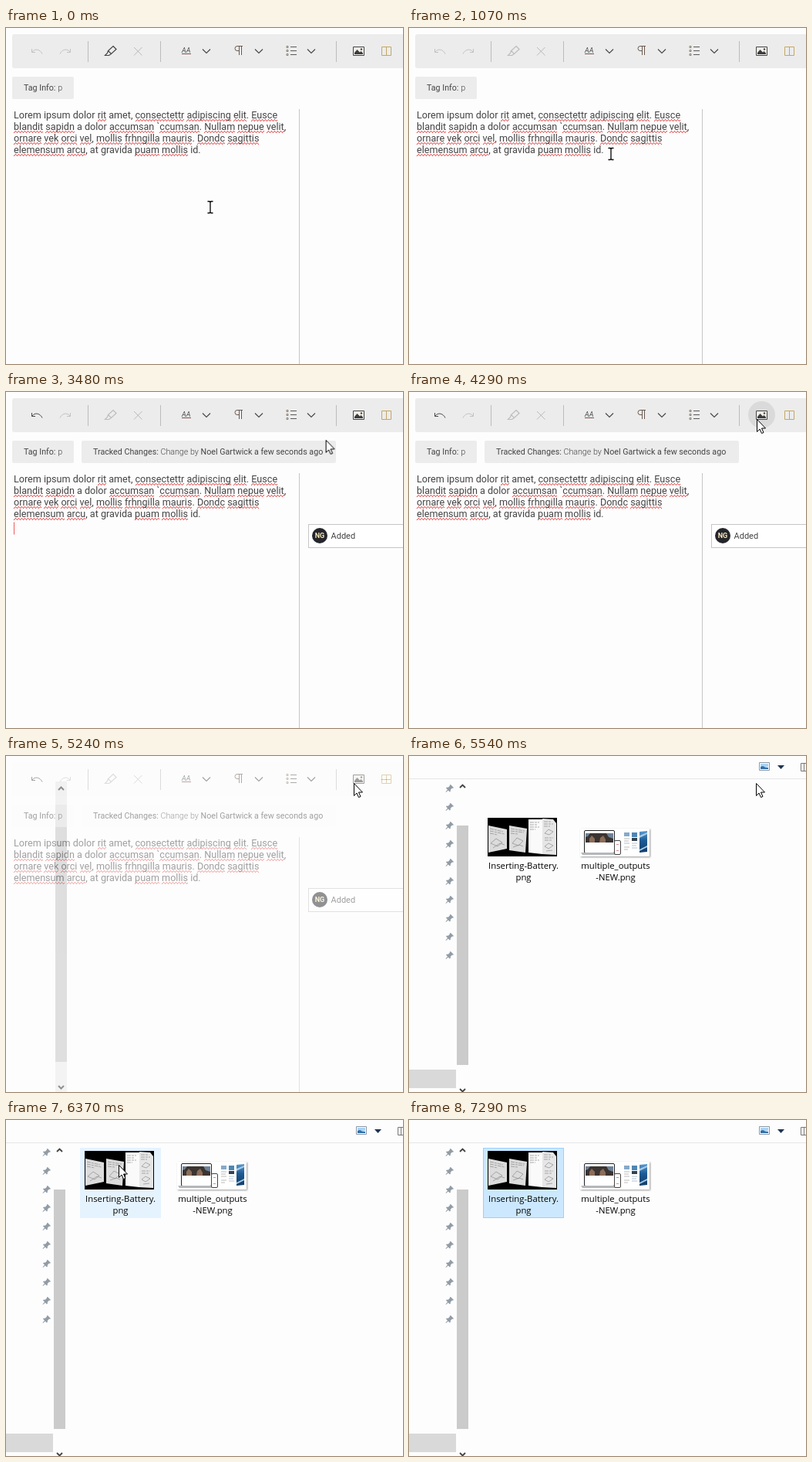
An HTML page that plays this animation: 515x435 px, repeating every 8000 ms.

```html
<!DOCTYPE html>
<html lang="en">
<head>
<meta charset="utf-8">
<title>Inserting an image</title>
<style>
  html, body { margin: 0; width: 100%; height: 100%; overflow: hidden; background: #fdfdfd; }
  .stage { position: relative; width: 515px; height: 435px; overflow: hidden; }
  svg { position: absolute; left: 0; top: 0; }
  text { font: 10.7px Roboto, sans-serif; fill: #444; }
  .light { font-weight: 300; }
  .line { fill: none; stroke: #4a4a4a; }
  .soft { stroke: #b9b9b9; }
  .panel { fill: #ececec; }
  .tip { fill: #fff; stroke: #000; }

  p {
    position: absolute; left: 10px; top: 105px; margin: 0;
    font: 12.6px/15px Roboto, sans-serif; color: #444; white-space: pre;
  }
  /* three one-pixel rows form a zigzag */
  u {
    --r: #e23c3c;
    text-decoration: none; padding-bottom: 1px;
    background:
      linear-gradient(90deg, #0000 2px, var(--r) 2px 3px, #0000 3px) 0 calc(100% - 2px) / 4px 1px repeat-x,
      linear-gradient(90deg, #0000 1px, var(--r) 1px 2px, #0000 2px 3px, var(--r) 3px) 0 calc(100% - 1px) / 4px 1px repeat-x,
      linear-gradient(90deg, var(--r) 1px, #0000 1px) 0 100% / 4px 1px repeat-x;
  }

  .dialog text { font: 11.3px "Open Sans", "Noto Sans", sans-serif; fill: #000; text-anchor: middle; }

  /* everything runs on one 8 s clock */
  .t { animation: 8s step-end infinite; }
  .brush { animation-name: brush; }
  .undo { animation-name: undo; }
  .end-caret { animation-name: end-caret; }
  .new-caret { animation-name: new-caret; }
  .change { animation-name: change; }
  .hover { animation-name: hover; }
  .panel { animation-name: panel; }
  .veil { animation-name: veil; }
  .dialog { animation-name: dialog; }
  .files { animation-name: files; }
  .pick { animation-name: pick; }
  .pass { animation-name: pass; }
  .beam { animation-name: beam; }
  .arrow { animation-name: arrow; }
  .mouse { animation-name: mouse; }

  @keyframes brush { 0% { stroke: #444 } 8.25%, to { stroke: #bdbdbd } }
  @keyframes undo { 0% { stroke: #c2c2c2 } 24.74%, to { stroke: #4a4a4a } }
  @keyframes end-caret { 0%, 24.74%, to { opacity: 0 } 19.37% { opacity: 1 } }
  @keyframes new-caret { 0%, 33.37%, 47.24%, to { opacity: 0 } 24.74%, 40% { opacity: 1 } }
  @keyframes change { 0% { opacity: 0 } 26.37%, to { opacity: 1 } }
  @keyframes hover { 0%, 62%, to { fill: #0000 } 50.43% { fill: #dadada } 59% { fill: #d2d2d2 } }
  @keyframes panel { 0% { fill: #ececec } 65.49%, to { fill: #fbfbfb } }
  @keyframes veil { 0%, 67.37%, to { opacity: 0 } 65.49% { opacity: .5 } }
  @keyframes dialog { 0% { opacity: 0 } 67.37% { opacity: .9 } 69.24%, to { opacity: 1 } }
  @keyframes files {
    0% { opacity: 0; transform: none }
    69.24% { opacity: 1; transform: none }
    72.49%, to { opacity: 1; transform: translateY(-40px) }
  }
  @keyframes pick {
    0% { fill: #0000; stroke: #0000 }
    79.61% { fill: #e5f3ff; stroke: #e5f3ff }
    81.49%, to { fill: #cce8ff; stroke: #99d1ff }
  }
  @keyframes pass { 0%, 77.83%, to { fill: #0000 } 76.05% { fill: #e5f3ff } }
  @keyframes beam { 0% { opacity: 1 } 39.32%, to { opacity: 0 } }
  @keyframes arrow { 0% { opacity: 0 } 39.32%, to { opacity: 1 } }
  @keyframes mouse {
    0% { transform: translate(265px, 232px) }
    3.25% { transform: translate(265px, 232px); animation-timing-function: steps(6, start) }
    15.4% { transform: translate(262px, 163px) }
    33.37% { transform: translate(262px, 163px); animation-timing-function: steps(7, start) }
    47.24% { transform: translate(440px, 45px); animation-timing-function: steps(2, start) }
    50.43% { transform: translate(478px, 26px); animation-timing-function: steps(3, start) }
    55.2% { transform: translate(451px, 35px) }
    69.24% { transform: translate(450px, 35px) }
    72.49% { transform: translate(450px, 35px); animation-timing-function: steps(5, start) }
    81.38% { transform: translate(146px, 58px) }
    83% { transform: translate(146px, 58px); animation-timing-function: steps(2, start) }
    86.24% { transform: translate(213px, 123px); animation-timing-function: steps(4, start) }
    92.7%, to { transform: translate(420px, 516px) }
  }
</style>
</head>
<body>
<div class="stage">

  <svg width="515" height="435">
    <defs>
      <path id="chevron" class="line" stroke-width="1.2" d="M-5 -2.5l5 5 5-5"/>
      <path id="turn" fill="none" d="M33.5 27v4.5h4.5M34 31c3-4.500 10-4 13 2.500"/>
    </defs>

    <path class="t panel" d="M11 8H515V52H11q-3 0-3-3V11q0-3 3-3z"/>
    <path stroke="#bcbcbc" d="M106.500 17V44M200.500 17V44M428.500 17V44"/>
    <circle class="t hover" cx="457.500" cy="29.500" r="17.500"/>

    <use href="#turn" class="t undo"/>
    <use href="#turn" stroke="#c2c2c2" transform="matrix(-1 0 0 1 117 0)"/>
    <path class="t brush" fill="none" stroke-width="1.2" d="M139 23.500l4 4-6.500 6-4-4zM132.500 29.500l-1 3-3 3h5l3-2"/>
    <path class="line soft" d="M166 25l10.500 10.500M176.500 25L166 35.500"/>

    <text x="228" y="31.500" style="font:italic 9px Roboto,sans-serif">AA</text>
    <path stroke="#865050" d="M228 33.500H240"/>
    <use href="#chevron" x="260" y="30"/>
    <path fill="none" stroke="#6b5a50" d="M307 23.500H300a3 3 0 0 0 0 6h2M302.500 23.500V35M305.500 23.500V35"/>
    <use href="#chevron" x="328" y="30"/>
    <path fill="none" stroke="#8c8070" d="M364 23.500h2v2h-2zM364 28.500h2v2h-2zM364 33.500h2v2h-2z"/>
    <path class="line" stroke-width=".9" d="M369 24.500H377M369 29.500H377M369 34.500H377"/>
    <use href="#chevron" x="396" y="30"/>

    <path fill="#f1eee6" stroke="#444" d="M450.500 24.500h14v11h-14z"/>
    <path fill="#3a3a42" d="M452 34v-2l3.500-4 3.500 3.500 1.500-1.500 2.500 2.500v1.500z"/>
    <circle cx="461" cy="27.500" r="1.200" fill="#444"/>
    <path fill="none" stroke="#c4a764" d="M487.500 24.500h12v11h-12zM493.500 24.500v11"/>

    <rect class="t panel" x="8" y="63" width="80" height="29" rx="2"/>
    <text x="23" y="81">Tag Info: <tspan class="light">p</tspan></text>

    <g class="t change">
      <rect class="t panel" x="98" y="63" width="330" height="29" rx="2"/>
      <text x="113" y="81">Tracked Changes: <tspan class="light">Change by</tspan> Noel Gartwick a few seconds ago</text>
      <rect x="392.500" y="171.500" width="130" height="30" fill="#fff" stroke="#c6c6c6"/>
      <circle cx="407" cy="186" r="10" fill="#25262b"/>
      <text x="407" y="189.300" text-anchor="middle" style="font:bold 9px Roboto,sans-serif;fill:#fbe8b8">NG</text>
      <text x="421.500" y="190" style="font-size:11px">Added</text>
    </g>

    <path stroke="#c6c6c6" d="M380.500 105V435"/>
    <path class="t end-caret" stroke="#444" d="M252.500 150v15"/>
    <path class="t new-caret" stroke="#ee5a5a" d="M10.500 168.500v16"/>
  </svg>

  <p>Lorem ipsum dolor <u>rit</u> amet, <u>consectettr</u> <u>adipiscing</u> <u>elit</u>. <u>Eusce</u>
<u>blandit</u> <u>sapidn</u> a dolor <u>accumsan</u> `<u>ccumsan</u>. <u>Nullam</u> <u>nepue</u> <u>velit</u>,
<u>ornare</u> <u>vek</u> <u>orci</u> <u>vel</u>, <u>mollis</u> <u>frhngilla</u> <u>mauris</u>. <u>Dondc</u> <u>sagittis</u>
<u>elemensum</u> <u>arcu</u>, at gravida <u>puam</u> <u>mollis</u> id.</p>

  <!-- dialog while it opens -->
  <svg class="t veil" width="515" height="435">
    <path fill="#fdfdfd" d="M0 0H515V435H0z"/>
    <path fill="#e8e8e8" d="M64 33h15v402H64z"/>
    <path fill="#dcdcdc" d="M64 63h15v29H64z"/>
    <path fill="#c0c0c0" d="M64 92h15v304H64z"/>
    <path fill="none" stroke="#222" stroke-width="2" d="M68 44l3.500-3.500 3.500 3.500M68 427l3.500 3.500 3.500-3.500"/>
    <path stroke="#999" d="M487 30.500h12"/>
  </svg>

  <svg class="t dialog" width="515" height="435">
    <defs>
      <pattern id="pins" x="45" y="30" width="16" height="24" patternUnits="userSpaceOnUse">
        <path fill="#929ca6" d="M9 7l4 4-1 .7-1-.2-2.200 2.200.1 1.800-1 1-2-2-2.900 2.500-.5-.5 2.500-2.900-2-2 1-1 1.800.1 2.200-2.200-.2-1z"/>
      </pattern>
      <filter id="shade" x="-10%" y="-10%" width="130%" height="140%">
        <feDropShadow dx="1" dy="1" stdDeviation="1" flood-opacity=".4"/>
      </filter>
      <linearGradient id="cover" x2="0" y2="1">
        <stop stop-color="#5b9bd0"/>
        <stop offset=".45" stop-color="#1d5a94"/>
        <stop offset="1" stop-color="#123d68"/>
      </linearGradient>
    </defs>

    <path fill="#fdfdfd" d="M0 0H515V435H0z"/>
    <path stroke="#e6e6e6" d="M0 29.500H515"/>
    <path fill="#fff" stroke="#8a98a8" d="M454.500 8.500h13v10h-13z"/>
    <path fill="#a9d3f2" d="M456 10h10v4h-10z"/>
    <path fill="#2f6fa8" d="M456 17v-3l3-1 3 1.500 4 .5v2z"/>
    <path fill="#1d3350" d="M478 12h9l-4.500 5z"/>
    <path fill="none" stroke="#777" d="M516 9.500h-7.500v10H516M512.500 9.500v10"/>

    <path fill="url(#pins)" d="M45 30h16v240H45z"/>
    <path fill="#d9d9d9" d="M0 406h61v24H0z"/>
    <path fill="#cbcbcb" d="M62 90h15v310H62z"/>
    <path fill="none" stroke="#444" stroke-width="1.800" d="M66 41l3.500-3.500 3.500 3.500M66 431l3.500 3.500 3.500-3.500"/>

    <g class="t files">
      <rect class="t pick" x="96.500" y="76.500" width="104" height="90"/>
      <g transform="translate(102 80)">
        <path d="M0 0h90v50H0z"/>
        <path fill="#dcdcdc" d="M1 10l24 5v25L1 45zM28 10l23 4-2 31-21-3z"/>
        <path fill="#fafafa" d="M53 2h18v45l-18-2z"/>
        <path fill="#e6e6e6" d="M71 1l14 1 4 5v41l-18-1z"/>
        <g fill="none" stroke="#8c8c8c" stroke-width=".7">
          <path stroke-dasharray="5 1 3 1" d="M3 14l17 4M3 17l19 4M3 20l10 2M30 14l18 3M30 17l17 2M30 20l9 1M55 6h12M55 9h10M55 12h12M55 15h7M73 5h9M73 8h12M73 11h8M74 26h11M74 29h9"/>
          <path d="M4 33l7-6 8 5-6 5zM7 39l9-6 6 2M32 33l6-7 8 4-6 6zM33 38l8-3 5 2M74 20l5-5 6 3-5 4zM74 37l5-4 6 3-6 4zM76 43l8-1"/>
        </g>
      </g>
      <text x="148.500" y="146">Inserting-Battery.</text>
      <text x="148.500" y="161">png</text>

      <rect class="t pass" x="216" y="76" width="105" height="91"/>
      <g transform="translate(222 94)">
        <path fill="#fff" filter="url(#shade)" d="M0 0h90v36H0z"/>
        <rect x="5.500" y="2.500" width="39" height="29" rx="1.500" fill="#fff" stroke="#222"/>
        <path fill="#3b3431" d="M7 6h36v12H7z"/>
        <path fill="#8b6d5a" d="M12 18v-5l3-4 4 4v5zM25 18l1-6 4-3 3 5v4z"/>
        <path fill="#6d8196" d="M34 6h9v7l-6-2zM7 6h6l-3 4-3 1z"/>
        <path fill="#b4b7bb" d="M1 31h49l-2 3H3z"/>
        <rect x="44.500" y="15.500" width="8" height="18" rx="1.500" fill="#fff" stroke="#444"/>
        <path stroke="#d88a90" d="M47 20.500h3M47 28.500h3"/>
        <path fill="#86a9c8" d="M57 5h7v5h-7z"/>
        <path stroke="#aaa" stroke-width=".8" d="M57 13h7M57 16h6M57 19h7M57 24h7M57 27h5"/>
        <path fill="#4d86b4" d="M67 5h7v6h-7z"/>
        <path fill="#34424e" d="M67 12h7v4h-7z"/>
        <path stroke="#9fb4c6" stroke-width=".8" d="M67 19h7M67 22h6M67 25h7"/>
        <path fill="url(#cover)" d="M77 4l10-1v27l-10 1z"/>
        <path fill="#a8cbe6" d="M77 9l10-4v2l-10 5zM77 27l10-5v2l-10 5z"/>
      </g>
      <text x="268" y="146">multiple_outputs</text>
      <text x="268" y="161">-NEW.png</text>
    </g>
  </svg>

  <svg width="515" height="435">
    <g class="t mouse">
      <g class="t beam" fill="none">
        <path stroke="#fff" stroke-width="3" d="M-3 -7.500H3M0 -7.500V7.500M-3 7.500H3"/>
        <path stroke="#000" stroke-width="1.300" d="M-3.500 -7.500H-1L0 -6.500L1 -7.500H3.500M0 -6.500V6.500M-3.500 7.500H-1L0 6.500L1 7.500H3.500"/>
      </g>
      <path class="t arrow tip" d="M.5 .5V16.500L4 13L6.500 18.500L9 17.500L6.500 12H11.500z"/>
    </g>
  </svg>

</div>
</body>
</html>
```
